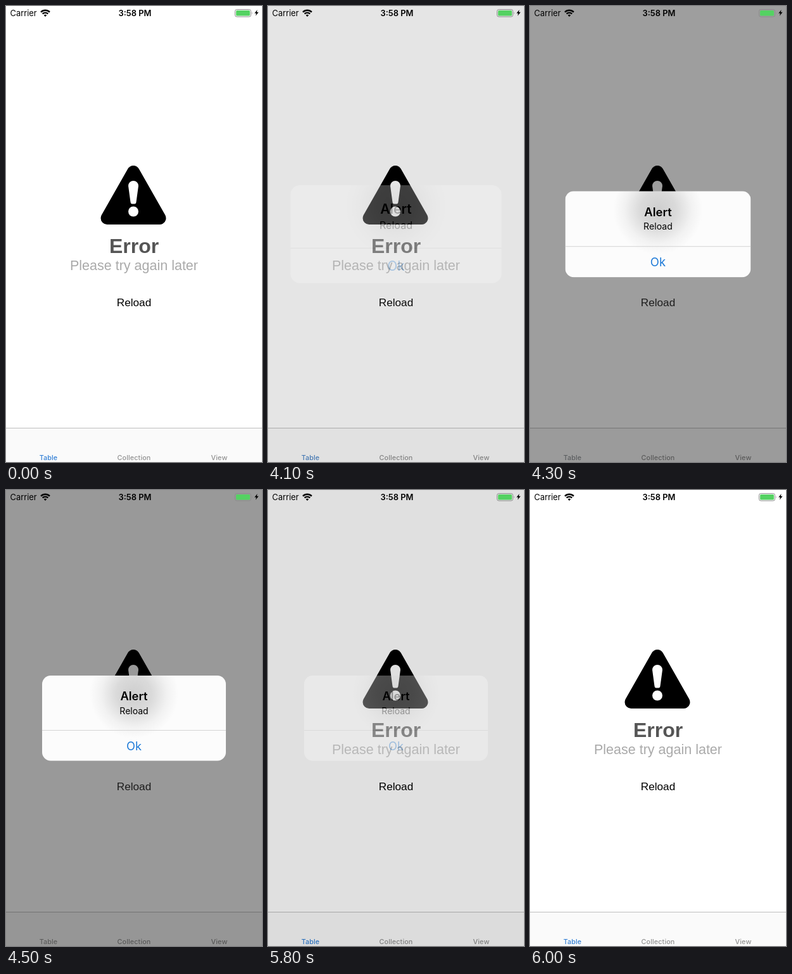
These frames come from a looping animation (404x720 px, 6.1 s). An HTML page:

```html
<!DOCTYPE html>
<html lang="en">
<head>
<meta charset="utf-8">
<title>Reload alert</title>
<style>
  html, body { margin: 0; width: 100%; height: 100%; overflow: hidden; background: #fff; }
  svg { display: block; width: 404px; height: 720px; }
  text { font-family: Inter, Roboto, sans-serif; }
  .mid { text-anchor: middle; }
  .page { font-family: "Liberation Sans", Arial, sans-serif; }
  .tab { font-size: 10.8px; font-weight: 500; letter-spacing: .1px; fill: #929292; }
</style>
</head>
<body>
<svg viewBox="0 0 404 720">
  <defs>
    <radialGradient id="shade" gradientUnits="userSpaceOnUse" cx="202" cy="322" r="70">
      <stop offset="0" stop-color="#cecece"/>
      <stop offset=".4" stop-color="#dadada"/>
      <stop offset=".75" stop-color="#f2f2f2"/>
      <stop offset="1" stop-color="#fcfcfc"/>
    </radialGradient>
    <clipPath id="card"><rect x="57" y="293" width="290" height="134.5" rx="13.5"/></clipPath>
  </defs>

  <rect width="404" height="720" fill="#fff"/>
  <path d="M201 262L242.5 335H159.5Z" stroke="#000" stroke-width="20" stroke-linejoin="round"/>
  <path d="M193 284a8 8 0 0 1 16 0L205.6 309q-.4 3.5-2.6 3.5h-4q-2.2 0-2.6-3.5Z" fill="#fff"/>
  <circle cx="201" cy="324.5" r="8" fill="#fff"/>
  <text class="mid page" x="202" y="389.5" font-size="32" font-weight="700" fill="#555">Error</text>
  <text class="mid page" x="202" y="417" font-size="21.5" fill="#aaa">Please try again later</text>
  <text id="reload" class="mid page" x="202" y="473.5" font-size="17.2">Reload</text>

  <rect y="667" width="404" height="53" fill="#fafafa"/>
  <rect y="666" width="404" height="1" fill="#bebebe"/>
  <text id="table" class="mid tab" x="67" y="716.5">Table</text>
  <text class="mid tab" x="202" y="716.5">Collection</text>
  <text class="mid tab" x="336.5" y="716.5">View</text>

  <rect id="dim" width="404" height="720"/>

  <g id="alert">
    <g clip-path="url(#card)">
      <rect x="57" y="293" width="290" height="135" fill="url(#shade)"/>
      <rect id="press" x="57" y="380" width="290" height="48" fill="#e8e8e8"/>
      <rect x="57" y="379" width="290" height="1" fill="#d4d4d4"/>
    </g>
    <text class="mid" x="202" y="332" font-size="18.3" font-weight="600">Alert</text>
    <text class="mid" x="202" y="353.5" font-size="14">Reload</text>
    <text class="mid" x="202" y="410.5" font-size="18.3" fill="#1f7bd8">Ok</text>
  </g>

  <text x="6.5" y="15.7" font-size="12.9">Carrier</text>
  <g fill="none" stroke="#000" stroke-width="2.3">
    <path d="M55 9.6a10 10 0 0 1 14 0M57.7 12.4a6.2 6.2 0 0 1 8.6 0"/>
    <path d="M62 17l-2.3-2.4a3.3 3.3 0 0 1 4.6 0Z" fill="#000" stroke="none"/>
  </g>
  <text class="mid" x="203.5" y="15.7" font-size="12.9" font-weight="600">3:58 PM</text>
  <rect x="361.5" y="5.5" width="25" height="11.5" rx="2.8" fill="none" stroke="#8c8c8c"/>
  <rect x="363" y="7" width="22" height="8.5" rx="1.5" fill="#54d262"/>
  <path d="M388 9.3q1.6 1.9 0 3.8Z" fill="#8c8c8c"/>
  <path d="M396.6 6l-4.4 5.6h2.7L394 15.6l4.6-5.8h-2.8Z"/>
</svg>
<script>
  const LOOP = 6100, STEP = 100;
  const rise = [0, .25, .785, .95, .99, 1];  // from 4000 ms
  const fall = [1, .3, .07, 0];              // from 5700 ms
  const el = id => document.getElementById(id);
  const [reload, table, dim, alertBox, press] = ["reload", "table", "dim", "alert", "press"].map(el);
  const mix = (a, b, k) => `rgb(${a.map((v, i) => Math.round(v + (b[i] - v) * k))})`;
  const at = (list, ms) => list[Math.min(list.length - 1, Math.floor(ms / STEP))];

  function draw(t) {
    const closing = t >= 5700;
    const p = t < 4000 ? 0 : closing ? at(fall, t - 5700) : at(rise, t - 4000);
    const gray = t < 5800 ? p : 0;
    const scale = closing ? 1 : 1.2 - .2 * p;

    dim.setAttribute("opacity", .4 * p);
    alertBox.setAttribute("opacity", Math.min(1, 1.13 * p));
    alertBox.setAttribute("transform", `translate(202 360.3) scale(${scale}) translate(-202 -360.3)`);
    press.setAttribute("opacity", t >= 5500 && !closing ? 1 : 0);
    reload.style.fill = mix([0, 0, 0], [48, 48, 48], gray);
    table.style.fill = mix([52, 128, 214], [152, 152, 152], gray);
  }

  const start = performance.now();
  function tick() {
    draw((performance.now() - start) % LOOP);
    requestAnimationFrame(tick);
  }
  tick();
</script>
</body>
</html>
```
